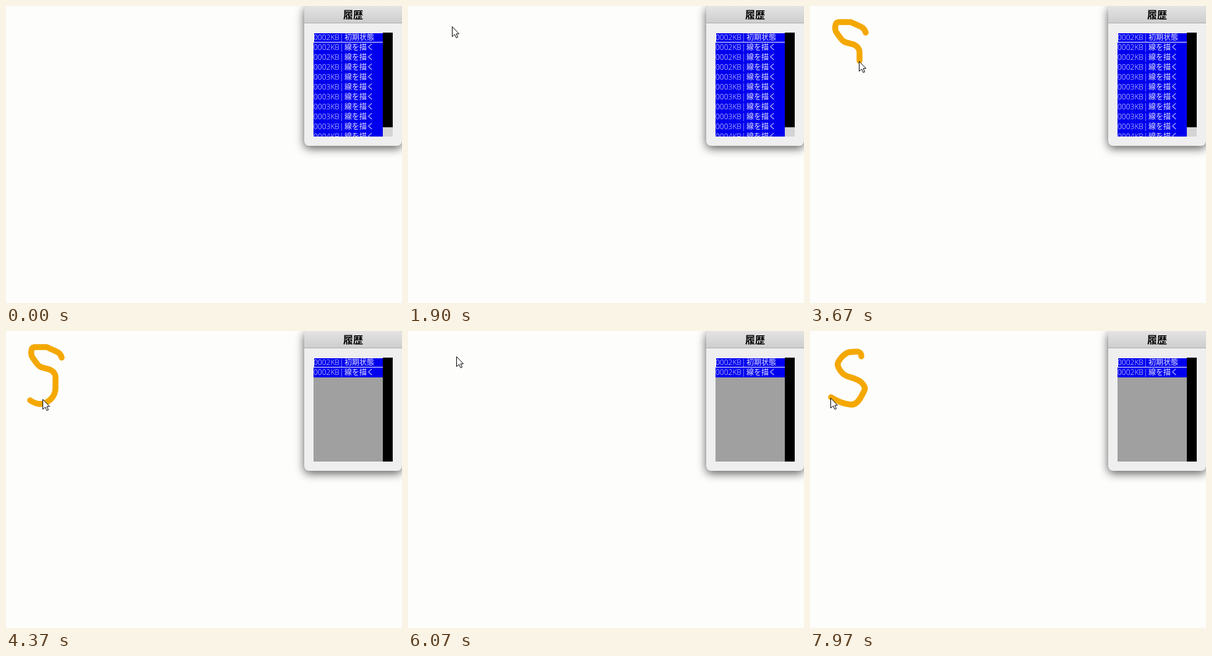
An HTML page with a canvas that plays this animation: 640x480 px, repeating every 8000 ms.

```html
<!DOCTYPE html>
<html lang="ja">
<head>
<meta charset="utf-8">
<style>
html, body { margin: 0; width: 100%; height: 100%; overflow: hidden; background: #fdfdfc; }
canvas { display: block; }
</style>
</head>
<body>
<canvas id="stage" width="640" height="480"></canvas>
<script>
const ctx = document.getElementById('stage').getContext('2d');
const LOOP = 8000;
const JAPANESE = '"Noto Sans CJK JP", "Noto Sans CJK", sans-serif';
const LATIN = '"Open Sans", sans-serif';
const LIST = { x: 497, y: 43, w: 112, h: 168, row: 16, bar: 16 };

// A stretch of pointer travel at even speed along an SVG path.
function leg(start, end, d) {
  const curve = document.createElementNS('http://www.w3.org/2000/svg', 'path');
  curve.setAttribute('d', d);
  const length = curve.getTotalLength();
  return {
    start, end, length, shape: new Path2D(d),
    travelled: t => length * Math.min(1, Math.max(0, (t - start) / (end - start))),
    at: distance => curve.getPointAtLength(distance)
  };
}

const firstPen = leg(2600, 4150, 'M90 43C87 33 82 34 66 26H46C39 27 40 39 43 43S51 56 56 58 68 61 72 63 80 69 80 75V92C80 108 66 118 54 118Q46 117 39 112');
const secondPen = leg(6260, 7970, 'M83 41C83 30 71 34 65 34S52 41 49 45 43 53 46 59 54 71 60 73 79 78 84 84 90 93 87 98 78 120 66 119 46 114 34 107');
const legs = [
  leg(1600, 1880, 'M150 -20L72 32'),
  leg(2200, 2550, 'M72 32L90 43'),
  firstPen,
  leg(4350, 4850, 'M39 112L540 52'),
  leg(5030, 5400, 'M540 52L142 65'),
  leg(5400, 5900, 'M142 65L79 40'),
  leg(6150, 6250, 'M79 40L83 41'),
  secondPen
];
const CLEARED = 4980;

function fillBox(color, x, y, w, h) {
  ctx.fillStyle = color;
  ctx.fillRect(x, y, w, h);
}

function drawPen(pen, t) {
  if (t < pen.start) return;
  ctx.save();
  ctx.setLineDash([pen.travelled(t), pen.length + 1]);
  ctx.lineWidth = 9.5;
  ctx.lineCap = ctx.lineJoin = 'round';
  ctx.strokeStyle = '#f4a800';
  ctx.stroke(pen.shape);
  ctx.restore();
}

function drawPanel() {
  ctx.save();
  ctx.shadowColor = 'rgba(0, 0, 0, .65)';
  ctx.shadowBlur = 15;
  ctx.shadowOffsetY = 4;
  ctx.beginPath();
  ctx.roundRect(482, -1, 158, 227, 8);
  ctx.fillStyle = '#efefef';
  ctx.fill();
  ctx.restore();

  ctx.save();
  ctx.clip();
  const header = ctx.createLinearGradient(0, 0, 0, 27);
  header.addColorStop(0, '#e4e4e4');
  header.addColorStop(1, '#cecece');
  fillBox(header, 482, 0, 158, 27);
  fillBox('#acacac', 482, 27, 158, 1);
  ctx.restore();

  ctx.fillStyle = '#000';
  ctx.font = `bold 16px ${JAPANESE}`;
  ctx.textAlign = 'center';
  ctx.fillText('履歴', 561, 20);
}

function drawList(count) {
  const { x, y, w, h, row, bar } = LIST;
  fillBox('#a0a0a0', x, y, w, h);
  fillBox('#000', x + w, y, bar, h);
  if (count > 2) fillBox('#d4d4d4', x + w, y + h - 15, bar, 15);

  ctx.save();
  ctx.beginPath();
  ctx.rect(x, y, w, h);
  ctx.clip();
  fillBox('#0000ee', x, y, w, row * count);
  ctx.textAlign = 'left';
  ctx.fillStyle = '#e4e4ff';
  for (let i = 0; i < count; i++) {
    const base = y + row * i + 12;
    const size = 2 + Math.floor((i + 2) / 6);
    ctx.font = `300 12px ${LATIN}`;
    ctx.fillText(`000${size}KB|`, x, base);
    ctx.font = `300 12px ${JAPANESE}`;
    ctx.fillText(i ? '線を描く' : '初期状態', x + 50, base);
  }
  ctx.lineWidth = 1;
  ctx.strokeStyle = '#fff';
  ctx.strokeRect(x + .5, y + .5, w, row - 1);
  ctx.restore();
}

const arrow = new Path2D('M0 0V16L4 12.5 6.5 18 9 17 6.5 11.5H11Z');

function drawPointer({ x, y }) {
  ctx.save();
  ctx.translate(Math.round(x) - .5, Math.round(y) + 1.5);
  ctx.fillStyle = '#fff';
  ctx.fill(arrow);
  ctx.lineWidth = 1;
  ctx.strokeStyle = '#000';
  ctx.stroke(arrow);
  ctx.restore();
}

function draw(t) {
  fillBox('#fdfdfc', 0, 0, 640, 480);
  if (t < CLEARED) drawPen(firstPen, t);
  drawPen(secondPen, t);
  drawPanel();
  drawList(t < firstPen.end ? 11 : 2);
  const current = legs.findLast(part => part.start <= t);
  if (current) drawPointer(current.at(current.travelled(t)));
}

const start = performance.now();
function tick() {
  draw((performance.now() - start) % LOOP);
  requestAnimationFrame(tick);
}
tick();
</script>
</body>
</html>
```
